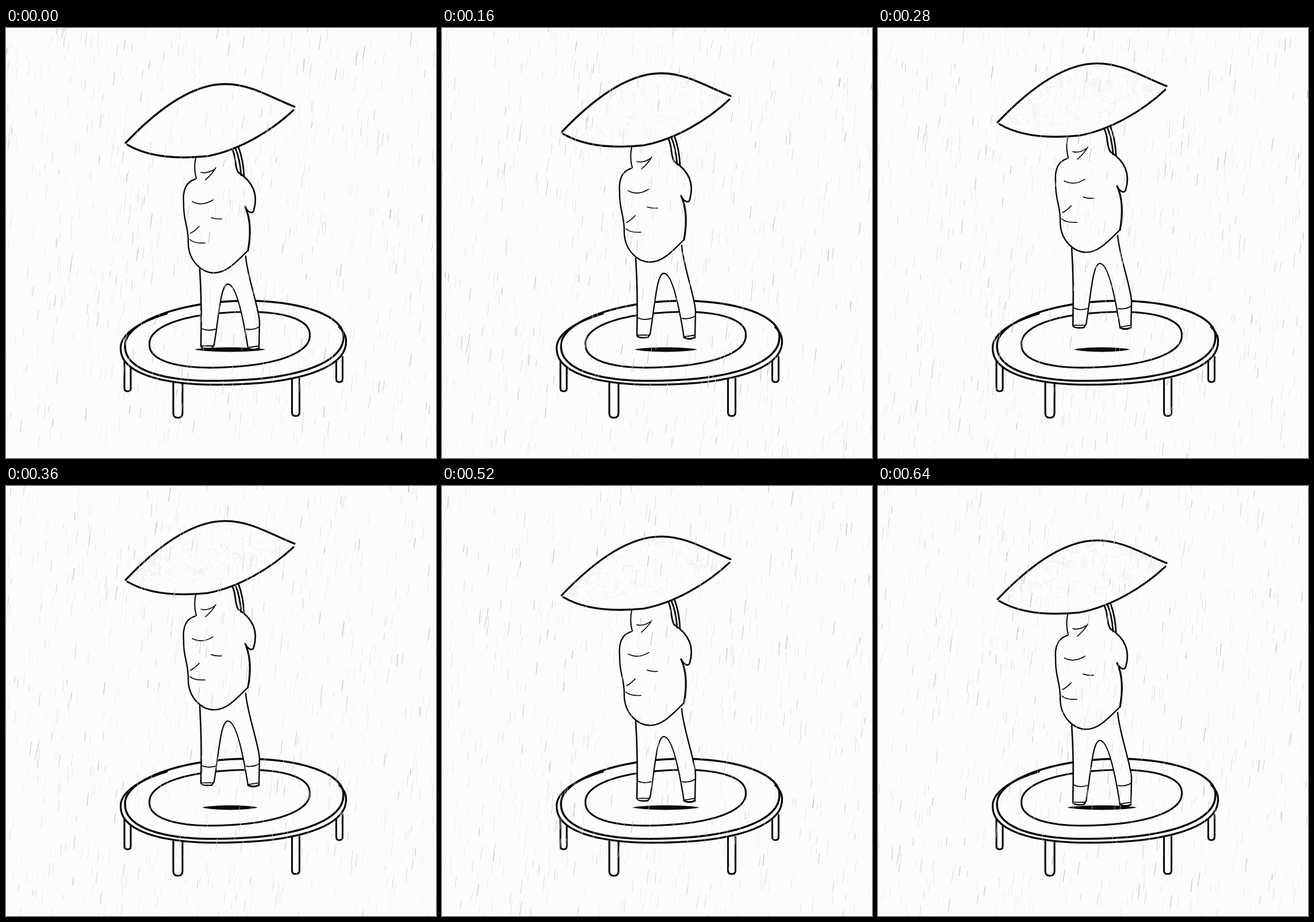
These frames come from a looping animation (748 px wide and 748 px high, 680 ms). An HTML page with a canvas:

```html
<!DOCTYPE html>
<html lang="en">
<head>
<meta charset="utf-8">
<title>Trampoline in the rain</title>
<style>
  html, body { margin: 0; width: 100%; height: 100%; overflow: hidden; background: #fcfcfc; }
  canvas { display: block; width: 748px; height: 748px; }
</style>
</head>
<body>
<canvas id="stage" width="748" height="748"></canvas>
<script>
const SIZE = 748, STEP = 40, STEPS = 17, PEAK_STEP = 8, PEAK = 37.5;
const PAPER = '#fcfcfc', INK = '#080808';
const ctx = document.getElementById('stage').getContext('2d');
ctx.lineCap = ctx.lineJoin = 'round';

function seeded(seed) {
  let s = seed;
  return () => {
    s = (s + 0x6D2B79F5) | 0;
    let r = Math.imul(s ^ (s >>> 15), 1 | s);
    r = (r + Math.imul(r ^ (r >>> 7), 61 | r)) ^ r;
    return ((r ^ (r >>> 14)) >>> 0) / 4294967296;
  };
}

// Eased rise, then a quick fall that settles softly
function jumpHeight(step) {
  const up = step / PEAK_STEP;
  if (up <= 1) return PEAK * up * up * (3 - 2 * up);
  const down = (step - PEAK_STEP) / (STEPS - PEAK_STEP);
  return PEAK / (1 + (down / 0.39) ** 3);
}

function ink(path, width) {
  ctx.strokeStyle = INK;
  ctx.lineWidth = width;
  ctx.stroke(path);
}

function paper(path) {
  ctx.fillStyle = PAPER;
  ctx.fill(path);
}

// Superellipse leaning up to the right; its halves may differ in squareness
function oval(cx, cy, rx, ry, lean, upper, lower, from = 0, to = 2 * Math.PI) {
  const path = new Path2D();
  const power = (v, p) => Math.sign(v) * Math.abs(v) ** (2 / p);
  for (let i = 0; i <= 120; i++) {
    const t = from + (to - from) * i / 120;
    const p = Math.sin(t) < 0 ? upper : lower;
    const c = power(Math.cos(t), p), s = power(Math.sin(t), p);
    path.lineTo(cx + rx * c, cy + ry * s - lean * c);
  }
  return path;
}

function post(x, top, bottom, width) {
  const path = new Path2D(), half = width / 2;
  path.moveTo(x - half, top);
  path.lineTo(x - half, bottom - half);
  path.quadraticCurveTo(x - half, bottom, x, bottom);
  path.quadraticCurveTo(x + half, bottom, x + half, bottom - half);
  path.lineTo(x + half, top);
  return path;
}

const bed = oval(397, 544, 190, 69, 8, 2, 2.3);
const rim = oval(395.5, 550, 196, 70, 6, 2, 2.3, -0.35, Math.PI + 0.94);
const mat = oval(389, 542.3, 139.5, 47.5, 8, 2.25, 2.25);
const posts = [post(299, 618, 678, 16), post(504, 610, 675, 13),
  post(211.5, 580, 632, 11), post(580, 572, 616, 11)];

const canopyTop = 'M208 200C245 161 314 97 382 97.5C425 98 455 118 502 137';
const canopyBottom = 'M500 143C462 179 405 213 350 223C300 228 250 226 211 203';
const neck = 'M330 226Q326 244 331 262';
const flank = 'M329 263C312 268 307 283 309 305C308 335 318 345 317 375' +
  'C318 405 340 426 362 426C385 426 402 405 421 387';
const side = 'M421 387C425 365 427 335 416 311';
const arm = 'M416 311C422 323 430 323 431 317C436 300 438 273 404 251';
const handle = 'M394 212C401 226 397 240 404 251M399 209Q407 228 409 256M404 206Q413 230 414 258';
const face = 'M339 251Q350 254 362 246M347 264Q358 255 365 243M324 302Q341 311 360 299' +
  'M357 330Q366 333 375 332M321 357Q329 353 336 345M320 368Q327 375 346 374';
const leftLeg = 'M337 419Q341 480 339 553Q340 559 358 557L362 551';
const inseam = 'M362 551C370 505 373 445.5 386 445.5C400 445.5 412 500 421 557';
const foot = 'M421 557Q430 562 440 557';
const rightLeg = 'M440 557L441 512C441 490 419 430 417 397';
const cuffs = 'M341 523Q350 528 364 524M418 524Q430 526 440 520M341 553H359M421 556L440 553';

const join = (...parts) =>
  new Path2D(parts.map((d, i) => i ? d.replace('M', 'L') : d).join(''));
const pen = (d, width) => [new Path2D(d), width];

const canopy = join(canopyTop, canopyBottom);
const torso = join(neck, flank, side, arm, 'M404 204');
const trousers = join(leftLeg, inseam, foot, rightLeg);
const canopyLines = [pen(canopyTop + canopyBottom, 3.3)];
const torsoLines = [pen(neck, 2.1), pen(flank, 2.4), pen(side, 3.2), pen(arm, 2.7),
  pen(handle, 2.8), pen(face, 1.7)];
const legLines = [pen(leftLeg, 2.6), pen(inseam, 2.3), pen(foot, 3), pen(rightLeg, 2.4),
  pen(cuffs, 1.9)];

const random = seeded(71);
const drops = Array.from({ length: 800 }, () => {
  const near = random();
  return {
    x: random() * SIZE,
    y: random() * SIZE,
    length: 9 + 16 * random(),
    lean: 0.07 + 0.09 * random(),
    laps: near > 0.5 ? 3 : 2,
    shade: Math.round(228 - 60 * near ** 6),
    width: 0.6 + 0.3 * near
  };
});

function drawTrampoline() {
  posts.forEach(p => ink(p, 3.1));
  paper(rim);
  ink(rim, 3.3);
  ink(bed, 3.5);
  ink(mat, 3.1);
}

function drawShadow(height) {
  const x = 389.5, y = 559.3, half = 62 - 0.375 * height, bulge = half * 0.6;
  ctx.beginPath();
  ctx.moveTo(x - half, y);
  ctx.bezierCurveTo(x - bulge, y - 5, x + bulge, y - 5, x + half, y);
  ctx.bezierCurveTo(x + bulge, y + 5.5, x - bulge, y + 5.5, x - half, y);
  ctx.fillStyle = INK;
  ctx.fill();
}

function drawSplashes(step) {
  const rnd = seeded(500 + step);
  const count = Math.min(150, Math.max(0, step - 1) * 32);
  ctx.strokeStyle = '#ebebeb';
  ctx.lineWidth = 0.8;
  ctx.beginPath();
  for (let i = 0; i < count; i++) {
    const u = 0.06 + 0.88 * rnd();
    const x = 208 + 294 * u;
    const y = 200 - 62 * u + (100 * rnd() - 66) * Math.sin(Math.PI * u);
    const angle = rnd() * Math.PI * 2, bend = angle + 1 + rnd() * 1.5;
    const reach = 5 + 7 * rnd();
    ctx.moveTo(x + reach * Math.cos(angle), y + reach * Math.sin(angle));
    ctx.lineTo(x, y);
    if (rnd() > 0.4) ctx.lineTo(x + 7 * Math.cos(bend), y + 7 * Math.sin(bend));
  }
  ctx.stroke();
}

function drawJumper(step, height) {
  ctx.save();
  ctx.translate(0, -height);
  paper(trousers);
  legLines.forEach(line => ink(...line));
  paper(torso);
  torsoLines.forEach(line => ink(...line));
  paper(canopy);
  drawSplashes(step);
  canopyLines.forEach(line => ink(...line));
  ctx.restore();
}

function drawRain(step) {
  const span = SIZE + 30;
  for (const d of drops) {
    const y = (d.y + d.laps * span * step / STEPS) % span - 30;
    const x = (d.x - y * 0.1 + SIZE) % SIZE;
    ctx.strokeStyle = `rgb(${d.shade},${d.shade},${d.shade})`;
    ctx.lineWidth = d.width;
    ctx.beginPath();
    ctx.moveTo(x, y);
    ctx.lineTo(x - d.length * d.lean, y + d.length);
    ctx.stroke();
  }
}

function draw() {
  const step = Math.floor(performance.now() / STEP) % STEPS;
  const height = jumpHeight(step);
  ctx.fillStyle = PAPER;
  ctx.fillRect(0, 0, SIZE, SIZE);
  drawTrampoline();
  drawShadow(height);
  drawJumper(step, height);
  drawRain(step);
  requestAnimationFrame(draw);
}
draw();
</script>
</body>
</html>
```
